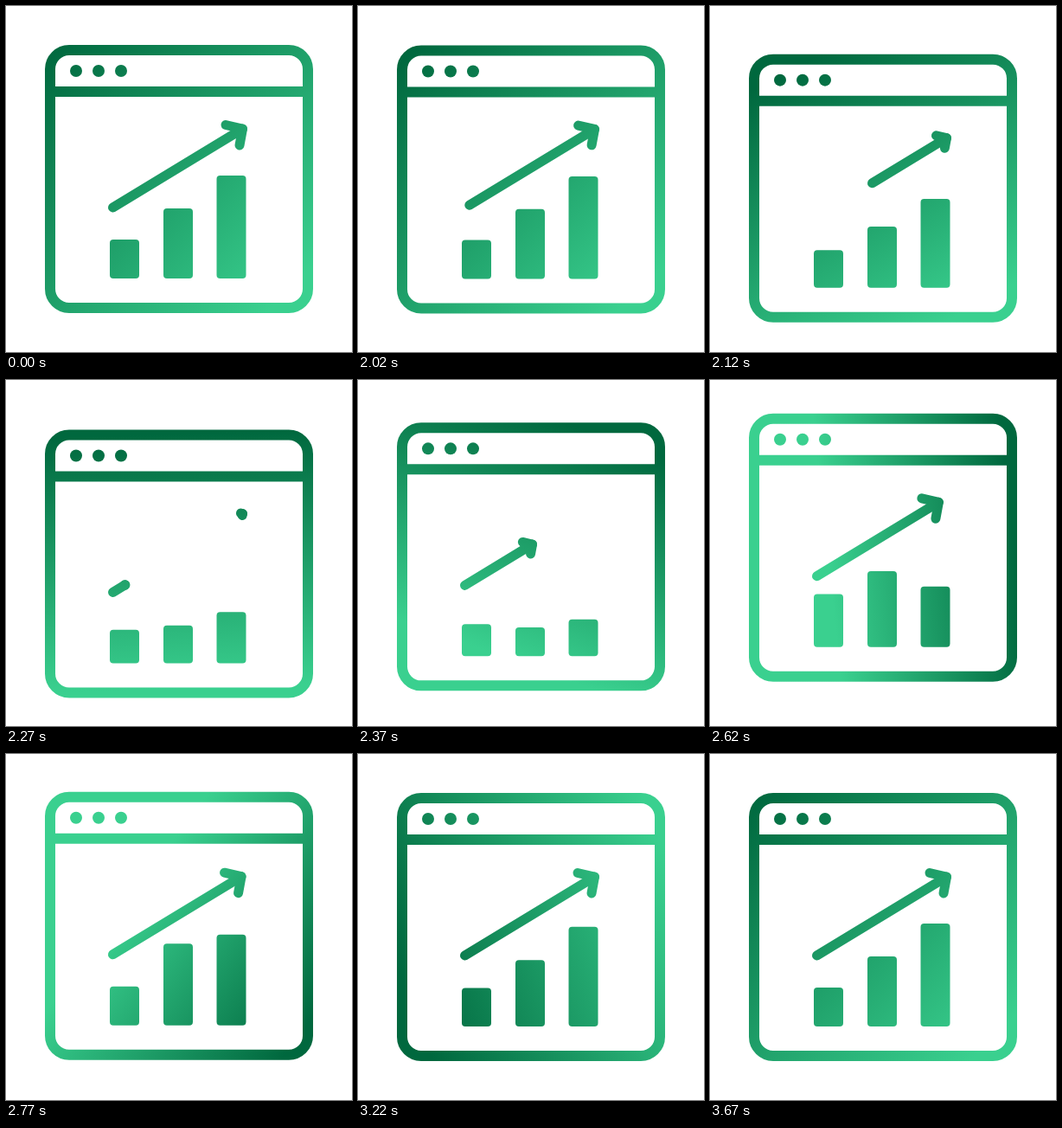
An HTML page with a canvas that plays this animation: 400 by 400 pixels, repeating every 3770 ms.

```html
<!DOCTYPE html>
<html lang="en">
<head>
<meta charset="utf-8">
<title>Growth chart</title>
<style>
html, body { margin: 0; width: 100%; height: 100%; overflow: hidden; background: #fff; }
canvas { display: block; }
</style>
</head>
<body>
<canvas id="stage" width="400" height="400"></canvas>
<script>
const ctx = document.getElementById('stage').getContext('2d');
const LOOP = 3770, START = 2020, END = 3670;

const TAIL = [123.5, 233], TIP = [273.5, 142];
const BASE = 315, BAR_WIDTH = 34;

// Resting top, lowest top while squashed, and time of the overshoot
const bars = [
  { x: 120, rest: 270, low: 278, peak: 2590 },
  { x: 182, rest: 234, low: 282, peak: 2700 },
  { x: 243.5, rest: 196, low: 273, peak: 3010 }
];

const clamp = u => Math.min(1, Math.max(0, u));
const span = (t, from, to) => clamp((t - from) / (to - from));
const sine = u => (1 - Math.cos(Math.PI * u)) / 2;
const mix = (a, b, u) => a + (b - a) * u;

// Eases through [time, value] turning points
function swing(t, ...keys) {
  let i = 0;
  while (i < keys.length - 2 && t > keys[i + 1][0]) i++;
  const [a, b] = keys.slice(i);
  return mix(a[1], b[1], sine(span(t, a[0], b[0])));
}

const lift = t => swing(t, [2000, 0], [2190, 15], [2560, -7], [2850, 0]);

const barTop = (t, { rest, low, peak }) => swing(t,
  [2000, rest], [2395, low], [peak, rest - 17], [peak + 310, rest + 10], [peak + 690, rest]);

// The dark end runs clockwise round the window's edge, the light end stays opposite
function gradient(t) {
  const u = span(t, 2000, 3600);
  const turn = Math.PI * (u + sine(u));
  const angle = turn - Math.PI * 3 / 4;
  const x = Math.cos(angle), y = Math.sin(angle);
  const dark = 150 / Math.max(Math.abs(x), Math.abs(y));
  const light = 125 + 65 * Math.cos(turn + Math.PI / 6);
  const g = ctx.createLinearGradient(200 + x * dark, 200 + y * dark, 200 - x * light, 200 - y * light);
  g.addColorStop(0, '#00683e');
  g.addColorStop(1, '#3ad08f');
  return g;
}

function strokePath(width, ...points) {
  ctx.lineWidth = width;
  ctx.beginPath();
  for (const p of points) ctx.lineTo(...p);
  ctx.stroke();
}

function box(x, y, w, h, r) {
  ctx.beginPath();
  ctx.roundRect(x, y, w, h, r);
}

// Part of the arrow between two fractions of its length
function arrow(from, to, size) {
  const at = u => [mix(TAIL[0], TIP[0], u), mix(TAIL[1], TIP[1], u)];
  const [x, y] = at(to);
  strokePath(11, at(from), [x, y]);
  strokePath(11, [x - 19.5 * size, y - 4.5 * size], [x, y], [x - 3.5 * size, y + 19 * size]);
}

function drawWindow() {
  ctx.lineWidth = 12;
  box(51, 51, 298, 298, 22);
  ctx.stroke();
  ctx.lineCap = 'butt';
  strokePath(12, [51, 99], [349, 99]);
  for (let i = 0; i < 3; i++) {
    ctx.beginPath();
    ctx.arc(81 + 26 * i, 75, 7, 0, 7);
    ctx.fill();
  }
}

function drawArrow(t) {
  ctx.lineCap = ctx.lineJoin = 'round';
  if (t < 2285) {
    const gone = sine(span(t, 1985, 2285));
    arrow(gone, 1, 1 - 0.9 * gone);
  }
  if (t > 2254) {
    const grown = 1 - (1 - span(t, 2254, 3110)) ** 5;
    arrow(0, grown, clamp(grown * 1.3 - 0.1));
  }
}

function draw(now) {
  let t = now % LOOP;
  if (t < START) t = 0;
  if (t > END) t = LOOP;
  ctx.fillStyle = '#fff';
  ctx.fillRect(0, 0, 400, 400);
  ctx.save();
  ctx.translate(0, lift(t));
  ctx.fillStyle = ctx.strokeStyle = gradient(t);
  drawWindow();
  for (const bar of bars) {
    const y = barTop(t, bar);
    box(bar.x, y, BAR_WIDTH, BASE - y, 4);
    ctx.fill();
  }
  drawArrow(t);
  ctx.restore();
  requestAnimationFrame(draw);
}
requestAnimationFrame(draw);
</script>
</body>
</html>
```
